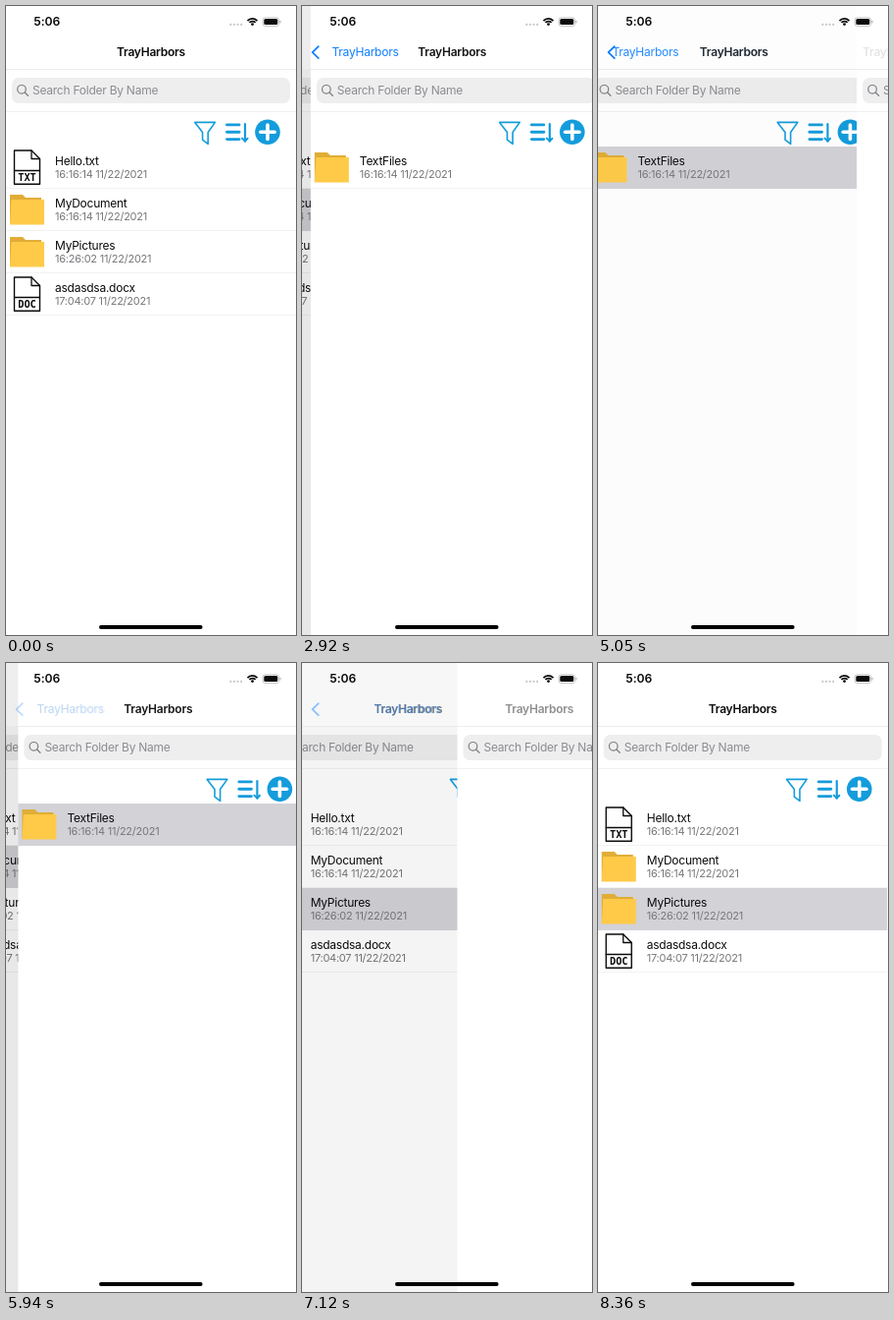
An HTML page with a canvas for the animation above (8410 ms loop, 296 by 640 pixels).

```html
<!DOCTYPE html>
<html lang="en">
<head>
<meta charset="utf-8">
<title>File browser</title>
<style>
html, body { margin: 0; width: 100%; height: 100%; overflow: hidden; background: #fff; }
canvas { display: block; width: 296px; height: 640px; }
</style>
</head>
<body>
<canvas id="stage"></canvas>
<script>
const W = 296, H = 640, LOOP = 8410, ROW = 43, LIST_TOP = 143;
const APP = 'TrayHarbors';
const ICON = '#149cdc', TINT = '#0a7cff', INK = '#0b0b0b';
const FONT = 'Inter, Roboto, "Liberation Sans", sans-serif';

const canvas = document.getElementById('stage');
const ctx = canvas.getContext('2d');
const dpr = window.devicePixelRatio || 1;
canvas.width = W * dpr;
canvas.height = H * dpr;

const rootRows = [
  ['TXT', 'Hello.txt', '16:16:14 11/22/2021'],
  ['', 'MyDocument', '16:16:14 11/22/2021'],
  ['', 'MyPictures', '16:26:02 11/22/2021'],
  ['DOC', 'asdasdsa.docx', '17:04:07 11/22/2021']
];
const docRows = [['', 'TextFiles', '16:16:14 11/22/2021']];

// Each transition: screen refresh times, spring start, depth before and after.
const moves = [
  { ticks: [2480, 2590, 2710, 2820, 2930, 3040], start: 2495, from: 0, to: 1 },
  { ticks: [3640, 3750, 3860, 3980, 4080, 4180], start: 3655, from: 1, to: 2 },
  { ticks: [4730, 4840, 4950, 5050, 5160, 5280], start: 4820, from: 2, to: 1 },
  { ticks: [5760, 5940, 6060, 6170, 6290, 6400], start: 5920.5, from: 1, to: 0 },
  { ticks: [6910, 7020, 7130, 7240, 7350, 7460], start: 6925, from: 0, to: 1 },
  { ticks: [7770, 7890, 8000, 8120, 8240, 8360], start: 7870.5, from: 1, to: 0 }
];

function spring(ms) {
  const k = Math.max(0, ms) * 0.0165;
  return 1 - (1 + k) * Math.exp(-k);
}

function stateAt(t) {
  const move = moves.filter(m => m.ticks[0] <= t).pop();
  if (!move) return { depth: 0, pressed: false };
  const tick = move.ticks.filter(v => v <= t).pop();
  const p = spring(tick - move.start);
  return {
    depth: move.from + (move.to - move.from) * p,
    pressed: move.to < move.from && p < 0.5,
    top: move.from
  };
}

function pagesAt(t) {
  const inPictures = t >= 6910;
  return [
    { rows: rootRows, selected: t < 2480 ? -1 : inPictures ? 2 : 1 },
    { rows: inPictures ? [] : docRows, selected: t >= 3640 ? 0 : -1 },
    { rows: [], selected: -1 }
  ];
}

function text(s, x, y, size, color, weight = 400, spacing = -0.25) {
  ctx.font = `${weight} ${size}px ${FONT}`;
  ctx.letterSpacing = spacing + 'px';
  ctx.fillStyle = color;
  ctx.fillText(s, x, y);
}

function box(x, y, w, h, color, r = 0) {
  ctx.fillStyle = color;
  ctx.beginPath();
  ctx.roundRect(x, y, w, h, r);
  ctx.fill();
}

function trace(points, closed) {
  ctx.beginPath();
  points.forEach(([x, y]) => ctx.lineTo(x, y));
  if (closed) ctx.closePath();
}

function line(points, color, width, closed) {
  ctx.strokeStyle = color;
  ctx.lineWidth = width;
  ctx.lineCap = ctx.lineJoin = 'round';
  trace(points, closed);
  ctx.stroke();
}

function shape(points, color) {
  ctx.fillStyle = color;
  trace(points, true);
  ctx.fill();
}

function disc(x, y, r, color) {
  ctx.fillStyle = color;
  ctx.beginPath();
  ctx.arc(x, y, r, 0, Math.PI * 2);
  ctx.fill();
}

function folder(y) {
  shape([[4, y + 6], [17, y + 6], [20, y + 9], [36, y + 9], [36, y + 36], [4, y + 36]], '#e0ad36');
  shape([[5.5, y + 11], [39, y + 11], [39, y + 36.5], [4, y + 36.5]], '#ffca48');
}

function fileIcon(y, label) {
  line([[8.5, y + 24.5], [8.5, y + 4], [26, y + 4], [34.5, y + 12.5], [34.5, y + 24.5]], INK, 1.4);
  line([[26, y + 4], [26, y + 12.5], [34.5, y + 12.5]], INK, 1.3);
  line([[8.5, y + 24.5], [34.5, y + 24.5], [34.5, y + 38.3], [8.5, y + 38.3]], INK, 1.4, true);
  ctx.textAlign = 'center';
  ctx.font = '700 10.3px "DejaVu Sans Mono", monospace';
  ctx.letterSpacing = '0px';
  ctx.fillStyle = INK;
  ctx.fillText(label, 21.5, y + 35.4);
  ctx.textAlign = 'left';
}

function searchField() {
  box(6, 73, 284, 26, '#eeeeef', 7);
  ctx.strokeStyle = '#808084';
  ctx.lineWidth = 1.2;
  ctx.beginPath();
  ctx.arc(16, 84.8, 4.3, 0, Math.PI * 2);
  ctx.stroke();
  line([[19.2, 88], [22.5, 91.3]], '#808084', 1.3);
  text('Search Folder By Name', 27, 90.3, 12, '#8c8c90');
}

function toolbar() {
  line([[192.8, 118.4], [213.4, 118.4], [206.2, 128.5], [206.2, 140.4],
    [200.6, 136.2], [200.6, 128.5]], ICON, 1.6, true);
  [120.9, 128.3, 135.6].forEach(y => line([[225.5, y], [238, y]], ICON, 2.9));
  line([[244, 120], [244, 137.6]], ICON, 2.2);
  line([[241, 134.6], [244, 137.6], [246.6, 134.8]], ICON, 2);
  disc(267, 128.3, 12.8, ICON);
  line([[259.8, 128.3], [274.2, 128.3]], '#fff', 3.6);
  line([[267, 121.1], [267, 135.5]], '#fff', 3.6);
}

function drawPage(page, x, dim) {
  ctx.save();
  ctx.translate(x, 0);
  box(0, 0, W, H, '#fff');
  searchField();
  box(0, 107, W, 0.8, '#ebebeb');
  toolbar();
  page.rows.forEach(([kind, name, date], i) => {
    const y = LIST_TOP + i * ROW;
    if (i === page.selected) box(0, y, W, ROW, '#d2d2d7');
    else box(0, y + ROW - 0.8, W, 0.8, '#eeeeee');
    if (kind) fileIcon(y, kind);
    else folder(y);
    text(name, 50, y + 18.8, 12, INK);
    text(date, 50, y + 31.8, 11, '#77777b');
  });
  ctx.restore();
  if (dim > 0) box(0, 0, W, H, `rgba(0,0,0,${dim * 0.095})`);
}

function drawNav(state) {
  box(0, 0, W, 64.5, 'rgba(255,255,255,0.25)');
  box(0, 64.3, W, 0.8, '#e6e6e6');
  for (let level = 0; level < 3; level++) {
    const u = level - state.depth;
    if (Math.abs(u) >= 1) continue;
    const alpha = 1 - Math.abs(u);
    const held = state.pressed && level === state.top;
    ctx.globalAlpha = alpha;
    text(APP, 113 + u * (u > 0 ? 176 : 85), 51.3, 12, INK, 600);
    if (level > 0) {
      ctx.globalAlpha = alpha * (held ? 0.25 : 1);
      text(APP, 28 + u * (u > 0 ? 85 : 126), 51.3, 12, TINT);
    }
  }
  ctx.globalAlpha = Math.min(1, state.depth) * (state.pressed ? 0.28 : 1);
  line([[16.8, 41.2], [10.6, 47.2], [16.8, 53.2]], TINT, 1.8);
  ctx.globalAlpha = 1;
}

function drawStatus() {
  text('5:06', 28.3, 20.3, 12.2, INK, 600, -0.1);
  for (let i = 0; i < 4; i++) disc(229.3 + i * 3.6, 18.8, 1.1, '#c4c4c6');
  ctx.strokeStyle = INK;
  ctx.lineCap = 'butt';
  ctx.lineWidth = 1.7;
  [6.9, 4.2].forEach(r => {
    ctx.beginPath();
    ctx.arc(251.5, 19.8, r, -Math.PI * 0.76, -Math.PI * 0.24);
    ctx.stroke();
  });
  disc(251.5, 18.6, 1.4, INK);
  ctx.strokeStyle = '#b4b4b6';
  ctx.lineWidth = 0.8;
  ctx.beginPath();
  ctx.roundRect(262, 11.8, 16.6, 8.6, 2.6);
  ctx.stroke();
  box(263.3, 13.1, 14, 6, INK, 1.5);
  box(279.4, 14.7, 1.1, 2.8, '#b4b4b6', 0.5);
}

function draw(t) {
  const state = stateAt(t);
  ctx.setTransform(dpr, 0, 0, dpr, 0, 0);
  box(0, 0, W, H, '#fff');
  pagesAt(t).forEach((page, level) => {
    const u = level - state.depth;
    if (Math.abs(u) < 1) drawPage(page, u * (u > 0 ? W : 89), Math.max(0, -u));
  });
  drawNav(state);
  drawStatus();
  box(95, 630, 105.6, 4, '#000', 2);
}

const begin = performance.now();
function frame() {
  draw((performance.now() - begin) % LOOP);
  requestAnimationFrame(frame);
}
frame();
</script>
</body>
</html>
```
